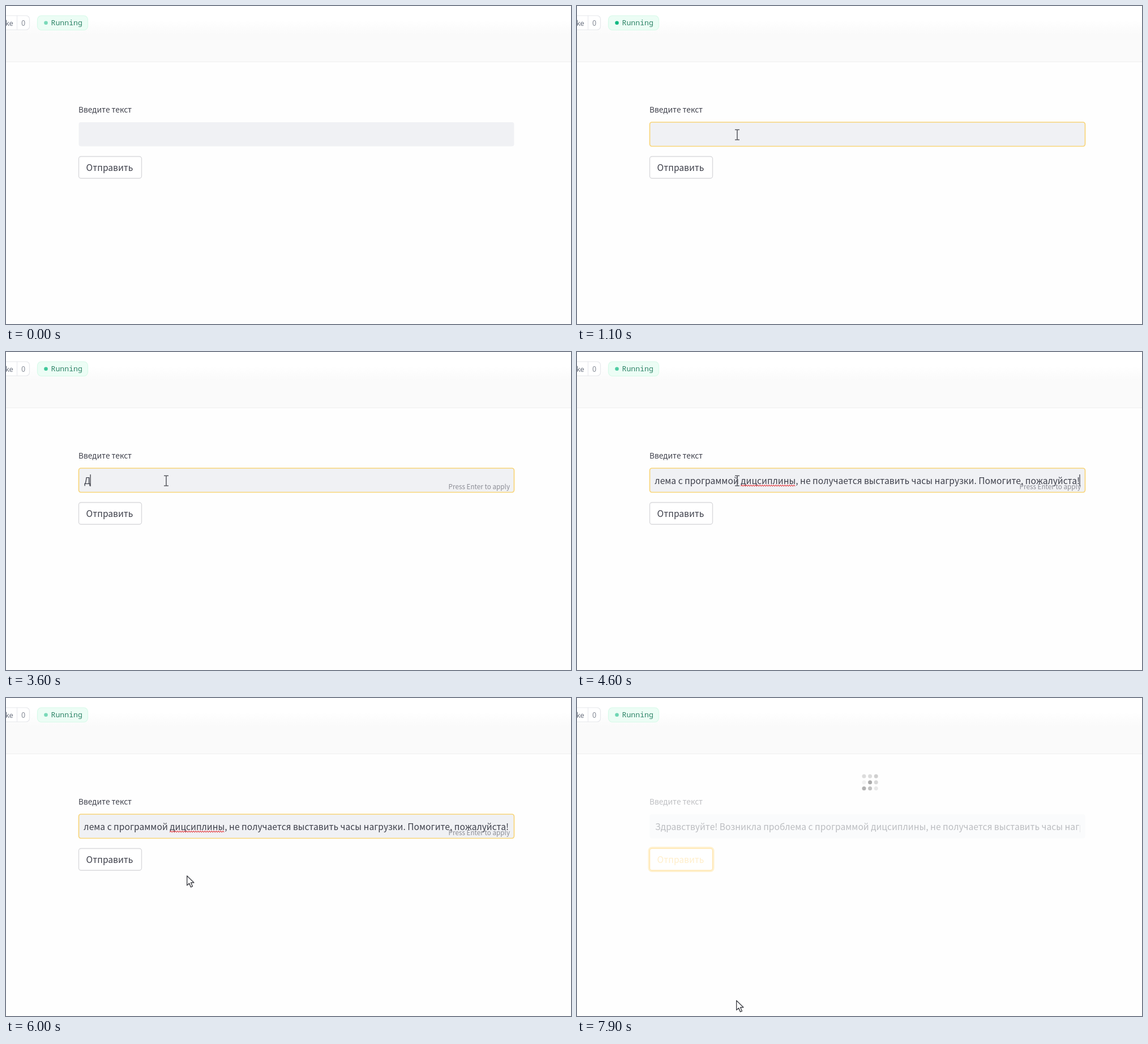
These frames come from a looping animation (998 by 561 pixels, 8 s). An HTML page with a canvas:

```html
<!DOCTYPE html>
<html lang="ru">
<head>
<meta charset="utf-8">
<title>Введите текст</title>
<style>
  html, body { margin: 0; width: 100%; height: 100%; overflow: hidden; background: #fff; }
  canvas { display: block; width: 100%; height: 100%; }
</style>
</head>
<body>
<canvas id="stage" width="998" height="561"></canvas>
<script>
const ctx = document.getElementById('stage').getContext('2d');
const LOOP = 8000, STEP = 100;
const SANS = '"Noto Sans CJK SC", "Noto Sans CJK JP", "Noto Sans CJK", "Open Sans", sans-serif';
const MONO = '"Noto Sans Mono", "DejaVu Sans Mono", monospace';
const INK = '#3d3f4a', ACCENT = '#ffca5f';

const DRAFT = 'Дообрый д';
const MESSAGE = 'Здравствуйте! Возникла проблема с программой дицсиплины, ' +
  'не получается выставить часы нагрузки. Помогите, пожалуйста!';
const FOCUS = 500, TYPE = 1400, PASTE = 4300, HOVER = 6200, BLUR = 6300, RING = 7100, LOAD = 7600;
const deletions = [2600, 2700, 2800, 2900, 3000, 3300, 3400, 3600, 3800];
const edits = [FOCUS, ...Array.from(DRAFT, (_, i) => TYPE + i * STEP), ...deletions, PASTE];

const box = { x: 128.5, y: 205, w: 769, h: 42.5 };
const button = { x: 128.5, y: 265.5, w: 111, h: 38.5 };

// Pointer hot spot: time, x, y
const path = [
  [100, 161, 334], [200, 200, 318], [300, 265, 272], [400, 275, 257], [500, 283, 227],
  [5000, 283, 227], [5100, 325, 256], [5400, 503, 347], [5600, 503, 347], [5800, 413, 326],
  [6200, 225, 300], [6300, 217, 297], [7500, 217, 297], [7600, 208, 345], [7700, 203, 395],
  [7800, 238, 460], [7900, 281, 533]
];

const arrowShape = new Path2D('M.7 .8V17.5L4.6 13.9L7.5 20.6L10.5 19.3L7.6 12.8H13Z');
const handShape = new Path2D('M-2 2.2Q-2 .3-.2 .3Q1.6 .3 1.6 2.2V8.5Q1.8 6.9 3.4 7Q5 7.1 5.2 8.8' +
  'Q5.6 7.7 6.9 7.9Q8.5 8.1 8.6 9.8Q9.2 9 10.3 9.4Q11.5 9.9 11.5 11.5V17Q11.5 20 9.5 22V25H-.5V22.5' +
  'L-6.6 15.2Q-7.8 13.4-6.2 12.6Q-4.6 12-3.3 13.5L-2 15Z');

function text(str, x, y, size, color, { family = SANS, align = 'left', weight = 400 } = {}) {
  ctx.font = `${weight} ${size}px ${family}`;
  ctx.textAlign = align;
  ctx.fillStyle = color;
  ctx.fillText(str, x, y);
}

function panel({ x, y, w, h }, radius, fill, stroke, lineWidth = 1.2) {
  ctx.beginPath();
  ctx.roundRect(x, y, w, h, radius);
  if (fill) { ctx.fillStyle = fill; ctx.fill(); }
  if (stroke) { ctx.strokeStyle = stroke; ctx.lineWidth = lineWidth; ctx.stroke(); }
}

function line(points, color, width) {
  ctx.beginPath();
  points.forEach(([x, y]) => ctx.lineTo(x, y));
  ctx.strokeStyle = color;
  ctx.lineWidth = width;
  ctx.stroke();
}

function dot(x, y, r, color) {
  ctx.beginPath();
  ctx.arc(x, y, r, 0, 2 * Math.PI);
  ctx.fillStyle = color;
  ctx.fill();
}

function header(t) {
  const shade = ctx.createLinearGradient(0, 25, 0, 50);
  shade.addColorStop(0, '#fff');
  shade.addColorStop(1, '#fafafa');
  ctx.fillStyle = shade;
  ctx.fillRect(0, 0, 998, 98);
  ctx.fillStyle = '#efeff0';
  ctx.fillRect(0, 98, 998, 1);

  panel({ x: -20, y: 17, w: 61.5, h: 25 }, 6, '#fff', '#e5e7eb');
  line([[19.5, 17], [19.5, 42]], '#e5e7eb', 1);
  text('ke', 12.8, 34.5, 13, '#6b7280', { align: 'right' });
  text('0', 30.5, 34.5, 13, '#858b96', { align: 'center' });

  panel({ x: 55.5, y: 17, w: 89, h: 25.5 }, 7, '#ecfdf5', '#d8fae9');
  ctx.globalAlpha = 0.75 - 0.25 * Math.cos((t - 150) / 2000 * 2 * Math.PI);
  dot(70.5, 29.7, 3.3, '#10b981');
  ctx.globalAlpha = 1;
  text('Running', 79.5, 34, 13.2, '#2f8468', { family: MONO, weight: 500 });
}

function inputValue(t) {
  if (t >= PASTE) return MESSAGE;
  const typed = Math.max(0, Math.floor((t - TYPE) / STEP) + 1);
  const removed = deletions.filter(d => d <= t).length;
  return DRAFT.slice(0, Math.max(0, Math.min(typed, DRAFT.length) - removed));
}

function squiggle(x, value, word) {
  const at = value.indexOf(word);
  if (at < 0) return;
  const start = x + ctx.measureText(value.slice(0, at)).width;
  const end = start + ctx.measureText(word).width;
  const points = [];
  for (let i = 0; start + i * 2 < end; i++) points.push([start + i * 2, i % 2 ? 234.5 : 236.8]);
  line(points, '#e4494d', 1.1);
}

function inputField(t) {
  const focused = t >= FOCUS && t < BLUR;
  const value = inputValue(t);
  const left = 138, right = 888;
  panel(box, 4, '#f0f1f4', focused ? '#f8d579' : null, 1.7);

  ctx.save();
  ctx.beginPath();
  ctx.rect(left - 1, box.y, right - left + 2, box.h);
  ctx.clip();
  ctx.font = `400 15.64px ${SANS}`;
  const width = ctx.measureText(value).width;
  const x = focused ? Math.min(left, right - width) : left;
  text(value, x, 232.8, 15.64, INK);
  if (focused) {
    if (t >= 2100 && t < deletions[0]) squiggle(x, value, 'Дообрый');
    if (t > PASTE) squiggle(x, value, 'дицсиплины');
    const lastEdit = Math.max(...edits.filter(e => e <= t));
    if (Math.floor((t - lastEdit) / 500) % 2 === 0) {
      line([[x + width, 216], [x + width, 237]], '#30313a', 1.2);
    }
  }
  ctx.restore();
  if (focused && t >= TYPE) text('Press Enter to apply', 890, 242.3, 11.73, '#8b8c94', { align: 'right' });
}

function form(t) {
  // Ease-in fade while the submitted form is stale
  const stale = Math.max(0, Math.min(1, (t - 6400) / 950));
  ctx.globalAlpha = 1 - 0.67 * stale ** 1.6;
  text('Введите текст', 128, 187.8, 13.68, INK);
  inputField(t);
  const hot = t >= HOVER;
  if (t >= RING) panel({ x: 127.3, y: 264.3, w: 113.4, h: 40.9 }, 5, null, '#ffd36e', 3.6);
  panel(button, 4, '#fff', hot ? ACCENT : '#d9d9dc', 1.4);
  text('Отправить', 141.6, 290.7, 15.64, hot ? ACCENT : INK);
  ctx.globalAlpha = 1;
}

function spinner(t) {
  if (t < LOAD) return;
  const phases = [0.31, 0.31, 0.25, 0.44, 0, 0.29, 0.1, 0.19, 0.37];
  phases.forEach((phase, i) => {
    const wave = Math.cos(2 * Math.PI * (phase + (t - 7900) / 1200));
    ctx.globalAlpha = 0.45 + 0.35 * wave;
    dot(507 + i % 3 * 10.6, 138 + Math.floor(i / 3) * 10.7, 3.5, '#969696');
  });
  ctx.globalAlpha = 1;
}

function pointerAt(t) {
  const next = path.findIndex(p => p[0] > t);
  if (next < 0) return path[path.length - 1].slice(1);
  const [t0, x0, y0] = path[next - 1], [t1, x1, y1] = path[next];
  const k = (t - t0) / (t1 - t0);
  return [x0 + (x1 - x0) * k, y0 + (y1 - y0) * k];
}

const inside = (r, x, y) => x >= r.x && x <= r.x + r.w && y >= r.y && y <= r.y + r.h;

function pointer(t) {
  if (t < path[0][0]) return;
  const [x, y] = pointerAt(t);
  ctx.save();
  ctx.translate(x, y);
  ctx.lineJoin = 'round';
  if (inside(box, x, y)) {
    line([[-4, -8.7], [4, -8.7]], '#55565c', 1.4);
    line([[-4, 9], [4, 9]], '#55565c', 1.4);
    line([[0, -8.7], [0, 9]], '#55565c', 1.5);
  } else {
    const hand = inside(button, x, y);
    const shape = hand ? handShape : arrowShape;
    ctx.fillStyle = '#fff';
    ctx.strokeStyle = '#45464c';
    ctx.lineWidth = 1.4;
    ctx.fill(shape);
    ctx.stroke(shape);
    if (hand) [1.6, 5.2, 8.6].forEach(fx => line([[fx, 8.5], [fx, 12.5]], '#45464c', 1.1));
  }
  ctx.restore();
}

function frame(now) {
  const t = Math.floor(now % LOOP / STEP) * STEP;
  ctx.fillStyle = '#fefefe';
  ctx.fillRect(0, 0, 998, 561);
  header(t);
  form(t);
  spinner(t);
  pointer(t);
  requestAnimationFrame(frame);
}
requestAnimationFrame(frame);
</script>
</body>
</html>
```
